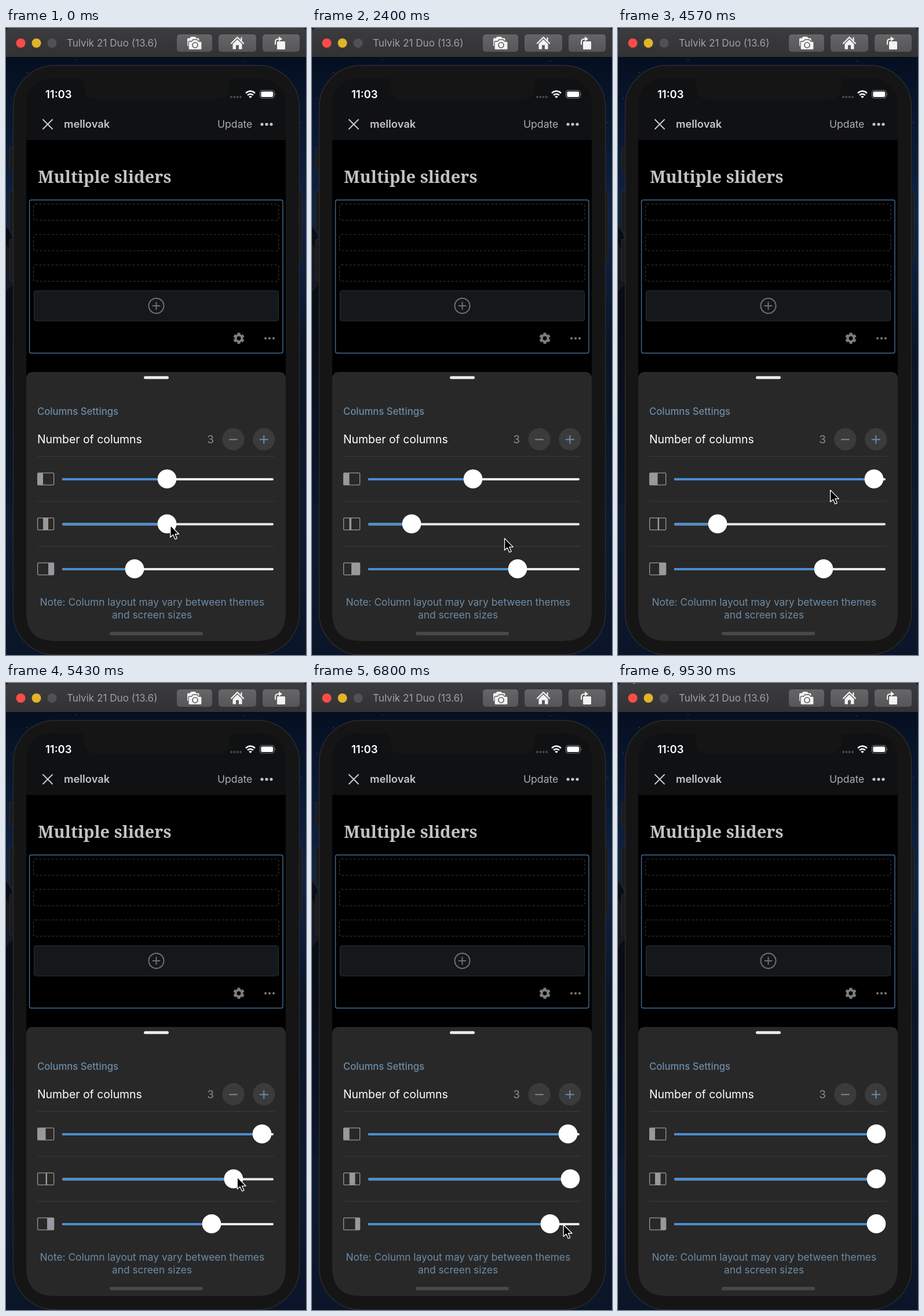
Animation, 518 px wide and 1081 px high, one loop 9560 ms. Source, as an HTML page:

```html
<!DOCTYPE html>
<html lang="en">
<head>
<meta charset="utf-8">
<title>Multiple sliders</title>
<style>
  html, body { margin: 0; width: 100%; height: 100%; overflow: hidden; background: #050b18; }
  svg { display: block; width: 518px; height: 1081px; }
  text { font-family: Inter, "Open Sans", sans-serif; }
  .line { fill: none; stroke-linecap: round; stroke-linejoin: round; }
</style>
</head>
<body>
<svg viewBox="0 0 518 1081" xmlns="http://www.w3.org/2000/svg">
  <defs>
    <linearGradient id="sky" x2="0" y2="1">
      <stop offset="0" stop-color="#040b1b"/>
      <stop offset=".12" stop-color="#08152b"/>
      <stop offset=".3" stop-color="#0e2343"/>
      <stop offset=".42" stop-color="#0b1c37"/>
      <stop offset=".52" stop-color="#0a1526"/>
      <stop offset=".8" stop-color="#0d1a30"/>
      <stop offset="1" stop-color="#0b1529"/>
    </linearGradient>
    <linearGradient id="shore" x2="0" y2="1">
      <stop offset="0" stop-color="#0a0c13"/>
      <stop offset=".4" stop-color="#090d17"/>
      <stop offset="1" stop-color="#0c172b"/>
    </linearGradient>
    <linearGradient id="bar" x2="0" y2="1">
      <stop offset="0" stop-color="#3c3c3e"/>
      <stop offset="1" stop-color="#323234"/>
    </linearGradient>
    <linearGradient id="key" x2="0" y2="1">
      <stop offset="0" stop-color="#666668"/>
      <stop offset="1" stop-color="#565658"/>
    </linearGradient>
  </defs>

  <!-- desktop -->
  <rect width="518" height="1081" fill="url(#sky)"/>
  <path d="M0 343 7 350 16 381V820H0Z" fill="url(#shore)"/>
  <path d="M0 372 8 384 5 410 14 440 0 455Z" fill="#151823"/>
  <g fill="#40608c">
    <circle cx="121" cy="55" r=".8"/><circle cx="37" cy="77" r=".8"/><circle cx="412" cy="57" r=".7"/>
    <circle cx="510" cy="163" r=".8"/><circle cx="9" cy="121" r=".7"/>
  </g>

  <!-- window bar -->
  <path d="M0 50V6Q0 0 6 0H512Q518 0 518 6V50Z" fill="url(#bar)"/>
  <path d="M0 50.5H518" stroke="#08090c"/>
  <circle cx="25.5" cy="26" r="8" fill="#fc4b48"/>
  <circle cx="52.5" cy="26" r="8" fill="#e3b32a"/>
  <circle cx="79.5" cy="26" r="8" fill="#505155"/>
  <text x="105" y="32" font-size="17.1" fill="#a0a0a2">Tulvik 21 Duo (13.6)</text>
  <g fill="url(#key)">
    <rect x="295" y="11" width="61" height="30" rx="5"/>
    <rect x="367" y="11" width="65" height="30" rx="5"/>
    <rect x="443" y="11" width="64" height="30" rx="5"/>
  </g>
  <g fill="#f3f3f3">
    <path d="M315 17.500H317.500L319.500 15H326.500L328.500 17.500H331.500Q333.500 17.500 333.500 19.500V31.500H315Q313 31.500 313 29.500V19.500Q313 17.500 315 17.500Z"/>
    <path d="M317 23H320.500L323 20H330L332.500 23H336Q338 23 338 25V35.500Q338 37.500 336 37.500H317Q315 37.500 315 35.500V25Q315 23 317 23Z" stroke="#5f5f61" stroke-width="1.300"/>
    <circle cx="326.500" cy="29.500" r="4.500" fill="none" stroke="#5f5f61" stroke-width="1.700"/>
    <path class="line" d="M389 26.500 399.500 16 410 26.500M406.500 17V21" stroke="#f3f3f3" stroke-width="2.200"/>
    <path d="M391.500 27.500 399.500 19.700 407.500 27.500V36.500H402V29.500H397V36.500H391.500Z"/>
    <rect x="468" y="23" width="14" height="14" rx="1.500"/>
    <path class="line" d="M465 28V24Q465 19 470 19H473" stroke="#f3f3f3" stroke-width="2"/>
    <path d="M471 14.500 477 19 471 23Z"/>
  </g>

  <!-- phone -->
  <g fill="#1b1b1d" stroke="#2a2b2e">
    <rect x="6" y="206" width="9" height="41" rx="2"/>
    <rect x="6" y="281" width="9" height="71" rx="2"/>
    <rect x="6" y="364" width="9" height="71" rx="2"/>
    <rect x="503" y="281" width="8" height="120" rx="2"/>
  </g>
  <rect x="12.500" y="64.500" width="494" height="1016" rx="72" fill="#151515" stroke="#2b2b2c" stroke-width="1.500"/>
  <rect x="35" y="87" width="448" height="970" rx="49" fill="#000"/>
  <path d="M35 193V136Q35 87 84 87H434Q483 87 483 136V193Z" fill="#101113"/>
  <path d="M126 86Q135 87 135 96V100Q135 123 158 123H362Q385 123 385 100V96Q385 87 394 86Z" fill="#151515"/>

  <!-- status and header -->
  <text x="68" y="121" font-size="18.500" font-weight="600" fill="#fff">11:03</text>
  <g fill="#48494b">
    <circle cx="389" cy="119" r="2"/><circle cx="394.300" cy="119" r="2"/>
    <circle cx="399.600" cy="119" r="2"/><circle cx="405" cy="119" r="2"/>
  </g>
  <path d="M419.200 118.200Q422 116 424.800 118.200L422 121Z" fill="#fff"/>
  <path fill="none" d="M414 112.200Q422 105.400 430 112.200M417 115.800Q422 111.700 427 115.800" stroke="#fff" stroke-width="2.500"/>
  <rect x="438.500" y="107.500" width="24.500" height="13.500" rx="3.800" fill="none" stroke="#77787a" stroke-width="1.200"/>
  <rect x="440.400" y="109.400" width="20.700" height="9.700" rx="2.200" fill="#fff"/>
  <path d="M464.500 112Q466.500 114.200 464.500 116.500Z" fill="#77787a"/>
  <path class="line" d="M64 158 80 174M80 158 64 174" stroke="#c9c9ca" stroke-width="2"/>
  <text x="100" y="172" font-size="18.300" font-weight="600" fill="#c5c5c7">mellovak</text>
  <text x="365" y="172" font-size="17.600" fill="#adadaf">Update</text>
  <g fill="#c5c5c7">
    <circle cx="442" cy="166" r="2.600"/><circle cx="450" cy="166" r="2.600"/><circle cx="458" cy="166" r="2.600"/>
  </g>

  <!-- editor -->
  <text x="55" y="267" font-size="28.900" font-weight="700" fill="#c3c3c3" style="font-family:'Noto Serif',serif">Multiple sliders</text>
  <rect x="40.500" y="296.500" width="437.500" height="264" rx="3" fill="none" stroke="#406d95" stroke-width="1.400"/>
  <g fill="none" stroke="#353637" stroke-width="1.200" stroke-dasharray="4 3">
    <rect x="47.500" y="303.500" width="423.500" height="28" rx="3"/>
    <rect x="47.500" y="356" width="423.500" height="28" rx="3"/>
    <rect x="47.500" y="408.500" width="423.500" height="28" rx="3"/>
  </g>
  <rect x="48.500" y="453" width="422" height="52" rx="3" fill="#14181b" stroke="#2d3032"/>
  <g class="line" stroke="#6d7073" stroke-width="2">
    <circle cx="259.500" cy="479" r="13"/>
    <path d="M253.500 479H265.500M259.500 473V485"/>
  </g>
  <g transform="translate(402 535)" id="gear" fill="none" stroke="#7c7e80"/>
  <g fill="#7c7e80">
    <circle cx="448" cy="535" r="2"/><circle cx="455" cy="535" r="2"/><circle cx="462" cy="535" r="2"/>
  </g>

  <!-- settings sheet -->
  <path d="M35 605Q35 593 47 593H471Q483 593 483 605V1008Q483 1057 434 1057H84Q35 1057 35 1008Z" fill="#282828"/>
  <rect x="238" y="600.300" width="43" height="5" rx="2.500" fill="#ebebeb"/>
  <text x="54" y="667" font-size="16.650" font-weight="500" fill="#6d8ba5">Columns Settings</text>
  <text x="54" y="716" font-size="19.400" fill="#fff">Number of columns</text>
  <text x="359" y="716" font-size="19" text-anchor="end" fill="#8a8a8d">3</text>
  <circle cx="392.500" cy="709" r="19.200" fill="#3b3b3b"/>
  <circle cx="445.300" cy="709" r="19.200" fill="#3b3b3b"/>
  <path class="line" d="M386 709.500H399M438.500 709.500H452M445.300 703V716" stroke="#6d8ba5" stroke-width="2"/>
  <path d="M54 738.500H464M54 816H464M54 893.500H464" stroke="#3b3b3c"/>
  <g id="rows"></g>
  <g font-size="17.350" text-anchor="middle" fill="#6d8ba5">
    <text x="252.300" y="996">Note: Column layout may vary between themes</text>
    <text x="252" y="1018">and screen sizes</text>
  </g>
  <rect x="179" y="1041" width="161" height="6" rx="3" fill="#484848"/>

  <path id="cursor" d="M0 0V20.500L4.700 16.300 8.200 24 11.600 22.500 8.200 15H14.800Z" fill="#000" stroke="#fff" stroke-width="1.300" stroke-linejoin="round"/>
</svg>
<script>
const LOOP = 9560, LAG = 33;
const MIN = 113, MAX = 446;

// Cursor: start point, then moves of [from ms, to ms, x, y]
const START = [283, 857];
const MOVES = [
  [30, 470, 177, 855],
  [870, 1130, 216, 951], [1130, 1270, 220, 935], [1270, 1370, 220, 924],
  [1570, 2070, 353, 920],
  [2230, 2720, 277, 775], [2720, 3100, 141, 773],
  [3750, 3770, 154, 773], [3770, 4330, 441, 776],
  [4470, 4765, 164, 850], [4765, 5730, 468, 852],
  [5900, 6400, 361, 932],
  [6600, 6940, 475, 934], [6940, 7130, 481, 932],
  [7430, 8000, 443, 775], [8050, 8330, 457, 780],
  [8670, 8800, 182, 161],
  [9000, 9220, 460, 640], [9220, 9530, 18, -24]
];

// Drags: [slider, from ms, to ms, grip offset]
const DRAGS = [
  [1, 30, 470, 5], [2, 1570, 2070, -2], [0, 2720, 3100, -1], [0, 3750, 4330, -1],
  [1, 4765, 5730, -8], [2, 6600, 7130, 6], [0, 8050, 8330, 1]
];
const REST = [278, 278, 222];

// Column borders in the icons: [from ms, first, second]
const SPLITS = [
  [0, 64, 73], [700, 66, 71], [2300, 64.5, 68], [3230, 57, 62],
  [4530, 68.5, 71], [5700, 64.7, 74.5], [7430, 64, 73.5]
];

const set = (node, attrs) => {
  for (const k in attrs) node.setAttribute(k, attrs[k]);
};
const el = (tag, attrs, parent) => {
  const node = document.createElementNS("http://www.w3.org/2000/svg", tag);
  set(node, attrs);
  return parent.appendChild(node);
};
const ease = u => u * u * (3 - 2 * u);

function cursorAt(t) {
  let [x, y] = START;
  for (const [a, b, nx, ny] of MOVES) {
    if (t <= a) break;
    const u = ease(Math.min(1, (t - a) / (b - a)));
    x += (nx - x) * u;
    y += (ny - y) * u;
  }
  return [x, y];
}

// A thumb trails the cursor by LAG while it is dragged
function thumbAt(i, t) {
  let x = REST[i];
  for (const [slider, a, b, grip] of DRAGS) {
    if (slider !== i || t - LAG < a) continue;
    x = cursorAt(Math.min(t - LAG, b))[0] - grip;
    x = Math.max(MIN, Math.min(MAX, x));
  }
  return x;
}

const gear = document.getElementById("gear");
el("circle", { r: 5.4, "stroke-width": 4 }, gear);
for (let a = 0; a < 360; a += 60) {
  el("path", { d: "M0 -6V-9.5", "stroke-width": 5, transform: `rotate(${a})` }, gear);
}

const rows = [777.5, 855, 932.5].map(y => {
  const g = el("g", { transform: `translate(0 ${y})` }, document.getElementById("rows"));
  const cell = el("rect", { y: -10.5, height: 21, fill: "#98989d" }, g);
  el("rect", { x: 54.6, y: -10.4, width: 28, height: 20.8, rx: 1.5, fill: "none", stroke: "#98989d", "stroke-width": 1.3 }, g);
  const track = { x: 97, y: -1.5, height: 4, rx: 2 };
  el("rect", { ...track, width: 365, fill: "#e9e9ea" }, g);
  const fill = el("rect", { ...track, fill: "#4b8ccf" }, g);
  const thumb = el("circle", { r: 16.3, cy: -0.1, fill: "#fff" }, g);
  return { cell, fill, thumb };
});
const cursor = document.getElementById("cursor");

function draw(t) {
  const [, first, second] = SPLITS.filter(s => s[0] <= t).pop();
  const edges = [54.5, first, second, 82.6];
  rows.forEach((row, i) => {
    const x = thumbAt(i, t);
    set(row.cell, { x: edges[i], width: edges[i + 1] - edges[i] });
    set(row.fill, { width: x - 97 });
    set(row.thumb, { cx: x });
  });
  const [x, y] = cursorAt(t);
  set(cursor, { transform: `translate(${x + 0.8} ${y + 0.5})` });
}

const begin = performance.now();
function tick() {
  draw((performance.now() - begin) % LOOP);
  requestAnimationFrame(tick);
}
draw(0);
requestAnimationFrame(tick);
</script>
</body>
</html>
```
